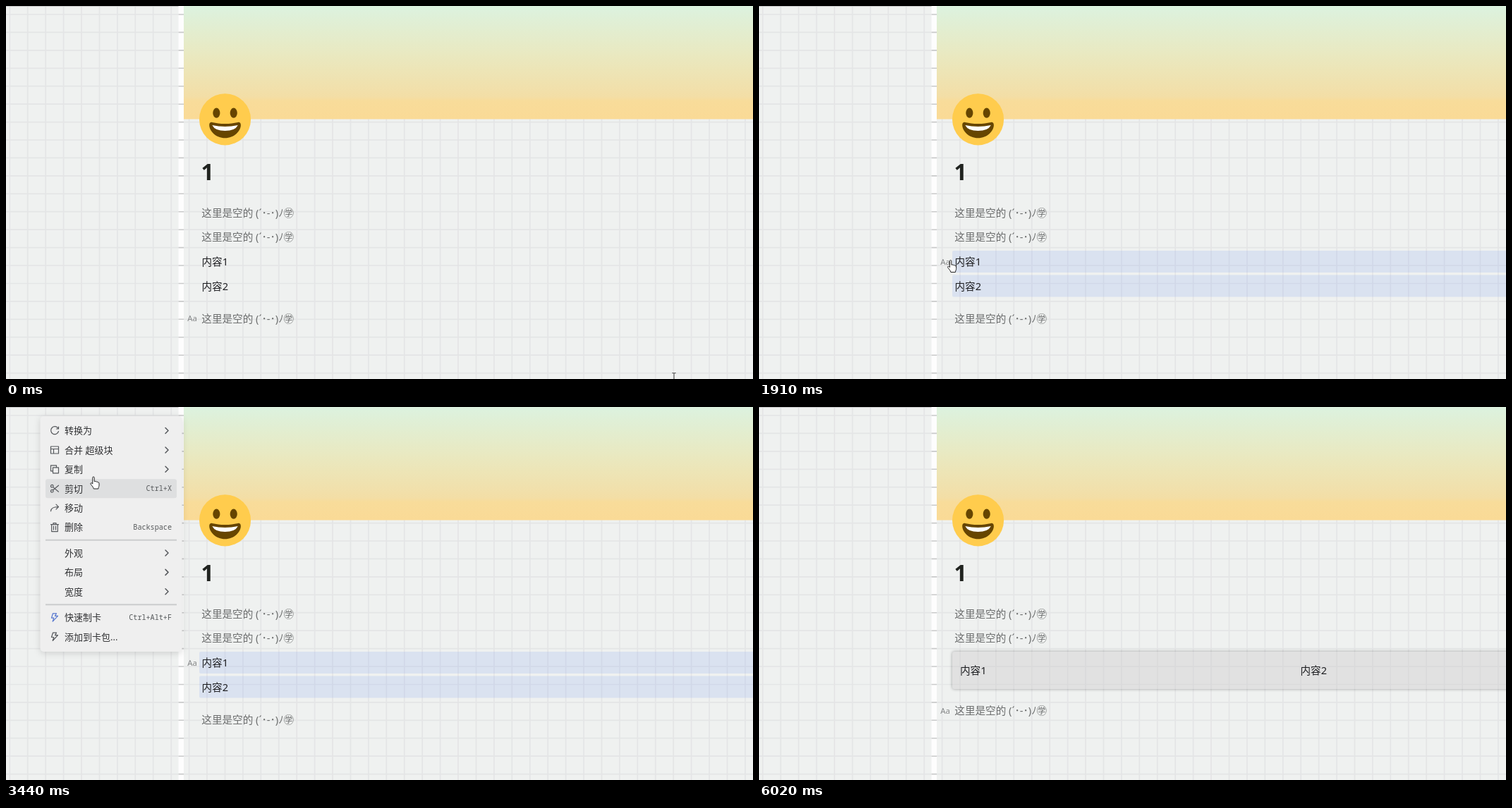
Animation of 1059 by 529 pixels, one loop 6.09 s. Source, as an HTML page:

```html
<!DOCTYPE html>
<html lang="zh-CN">
<head>
<meta charset="utf-8">
<title>Block menu</title>
<style>
  html, body { margin: 0; width: 100%; height: 100%; overflow: hidden; background: #eff1f0; }
  svg { display: block; width: 1059px; height: 529px; }
  text { font-family: "Noto Sans", "Noto Sans CJK SC", "Noto Sans CJK", sans-serif; white-space: pre; }
  .body { font-size: 14.6px; fill: #202124; }
  .empty { font-size: 14.6px; fill: #6c6e6e; }
  .item { font-size: 13px; fill: #303133; }
  .key { font: 10.15px "Noto Sans Mono", "DejaVu Sans Mono", monospace; fill: #55585a; text-anchor: end; }
  .tip { font-size: 11px; font-weight: 500; fill: #fff; }
  .icon { fill: none; stroke: #55585c; stroke-width: 1.2; stroke-linejoin: round; stroke-linecap: round; }
  .panel { fill: #efefef; filter: drop-shadow(0 2px 5px rgba(0,0,0,.14)); }
  .hover { fill: #dedfe0; }
  .native { fill: #9db8ee; }
  .caret { fill: #202124; }
</style>
</head>
<body>
<svg id="stage" viewBox="0 0 1059 529">
  <defs>
    <linearGradient id="cover" x1="0" y1="0" x2="0" y2="1">
      <stop offset="0" stop-color="#dcf2df"/>
      <stop offset=".42" stop-color="#e9e9c1"/>
      <stop offset=".8" stop-color="#f3dea6"/>
      <stop offset=".84" stop-color="#f8dc9a"/>
      <stop offset="1" stop-color="#fada96"/>
    </linearGradient>
    <filter id="blockShadow" x="-5%" y="-30%" width="110%" height="160%">
      <feGaussianBlur stdDeviation="2.2"/>
    </filter>
  </defs>
</svg>
<script>
const LOOP = 6090, STEP = 70;
const GRID = 25.43;
const MENU = [2820, 4530];
const SUBMENU = [3800, 4530];
const LAYOUT = 4530;
const svg = document.getElementById('stage');

function add(parent, tag, attrs = {}, text) {
  const el = document.createElementNS('http://www.w3.org/2000/svg', tag);
  for (const k in attrs) el.setAttribute(k, attrs[k]);
  if (text !== undefined) el.textContent = text;
  return parent.appendChild(el);
}
const group = (parent = svg) => add(parent, 'g');
const rect = (p, x, y, width, height, attrs) => add(p, 'rect', { x, y, width, height, ...attrs });
const path = (p, d, attrs) => add(p, 'path', { d, ...attrs });
// y is the middle of the line
function label(p, x, y, cls, size, text) {
  return add(p, 'text', { x, y: y + size * 0.37, class: cls }, text);
}
const icon = (p, x, y, d, attrs) =>
  path(p, d, { class: 'icon', transform: `translate(${x} ${y})`, ...attrs });

// Parts that are visible only during given spans of time
const timed = [];
function during(el, ...spans) {
  timed.push({ el, spans });
  return el;
}

// Backdrop
rect(svg, 0, 0, 1059, 529, { fill: '#eff1f0' });
let lines = '', ticks = '';
for (let x = 5.3; x < 1059; x += GRID) lines += `M${x.toFixed(1)} 0V529`;
for (let y = 12; y < 529; y += GRID) {
  lines += `M0 ${y.toFixed(1)}H1059`;
  ticks += `M244.500 ${y.toFixed(1)}H252`;
}
path(svg, lines, { stroke: '#e4e5e6', 'stroke-width': 1.7 });
rect(svg, 0, 0, 245, 1, { fill: '#c3c4c4' });
rect(svg, 244.5, 0, 7.5, 529, { fill: '#fdfdfd' });
path(svg, ticks, { stroke: '#c9caca', 'stroke-width': 1.6 });
rect(svg, 252, 0, 807, 160.5, { fill: 'url(#cover)' });

// Smiling face
const face = add(svg, 'g', { transform: 'translate(274 124.300) scale(2.030)' });
add(face, 'circle', { cx: 18, cy: 18, r: 18, fill: '#ffcc4d' });
for (const cx of [12, 24]) add(face, 'ellipse', { cx, cy: 13.5, rx: 2.5, ry: 3.5, fill: '#664500' });
path(face, 'M18 21C14.400 21 12 20.600 9 20C8.300 19.900 7 20 7 22C7 26 11.600 31 18 31S29 26 29 22C29 20 27.700 19.900 27 20C24 20.600 21.600 21 18 21Z', { fill: '#664500' });
path(face, 'M9 22Q18 24 27 22Q25 26 18 26T9 22Z', { fill: '#fff' });

// Selected and merged blocks
const blocks = during(group(), [910, LAYOUT]);
for (const y of [347, 381.5]) rect(blocks, 274, y, 790, 31, { rx: 2, fill: '#5a86f0', 'fill-opacity': 0.14 });
const native1 = during(rect(svg, 292, 350.5, 28, 24.5, { class: 'native' }), [1050, 1710]);
const native2 = during(rect(svg, 278, 385.500, 37.5, 24, { class: 'native' }), [840, 1710]);
during(rect(svg, 342.5, 358, 16, 30, { fill: '#c7d7f4', 'fill-opacity': 0.85 }), [980, 1780]);

const merged = during(group(), [LAYOUT, LOOP]);
rect(merged, 274, 347, 800, 53, { rx: 3, fill: '#000', opacity: 0.34, filter: 'url(#blockShadow)' });
rect(merged, 274, 347, 800, 53, { rx: 3, fill: '#e1e1e1' });
let inner = 'M274 368.100H1059M274 393.500H1059';
for (let x = 5.3 + GRID * 11; x < 1059; x += GRID) inner += `M${x.toFixed(1)} 347V400`;
path(merged, inner, { stroke: '#dadadb', 'stroke-width': 1.6 });

// Document text
const EMPTY = '这里是空的 (´･-･)ﾉ㊫';
add(svg, 'text', { x: 276.5, y: 247, 'font-size': 32, 'font-weight': 700, fill: '#20231f' }, '1');
label(svg, 277.3, 293.5, 'empty', 14.6, EMPTY);
label(svg, 277.3, 328, 'empty', 14.6, EMPTY);
const apart = during(group(), [0, LAYOUT]);
label(apart, 277.5, 363, 'body', 14.6, '内容1');
label(apart, 277.5, 397.5, 'body', 14.6, '内容2');
label(apart, 277.3, 443.5, 'empty', 14.6, EMPTY);
label(merged, 285, 374, 'body', 14.6, '内容1');
label(merged, 767.5, 374, 'body', 14.6, '内容2');
label(merged, 277.3, 430.5, 'empty', 14.6, EMPTY);

during(rect(svg, 277.5, 354, 1, 18, { class: 'caret' }), [2800, 3330], [3860, 4390]);
during(rect(svg, 285, 364, 1, 19, { class: 'caret' }), [LAYOUT, 4960], [5490, 6020]);

// Gutter mark: start time and row, 0 hides it
const gutterRows = [[0, 443], [420, 397.5], [840, 0], [1850, 363], [LAYOUT, 0], [4900, 293.5], [5040, 328], [5270, 0], [5410, 430.5]];
const gutter = add(svg, 'text', { x: 257.3, 'font-size': 11.3, fill: '#858788' }, 'Aa');

// Tooltip
const tip = during(group(), [2110, 2820]);
rect(tip, 155.5, 385, 118, 85, { rx: 4, fill: '#6f7070' });
['拖拽 移动位置', '点击 打开菜单', 'Ctrl+Click 进入', 'Alt+Click 折叠/展开', 'Shift+Click 修改属性']
  .forEach((s, i) => label(tip, 162.5, 396.8 + i * 15.5, 'tip', 11, s));

// Menu
const BOLT = 'M1 -5.500H-2.500L-4.500 .800H-1.200L-2.800 5.800L4.500 -2H.500L2.500 -5.500Z';
const CHEVRON = 'M-2 -4L2 0L-2 4';
const items = [
  [33.5, '转换为', '>', 'M5 -3A5.500 5.500 0 1 0 5.500 1M5.500 -5.500V-2.500H2.500'],
  [61, '合并 超级块', '>', 'M-5.500 -5H5.500V5H-5.500ZM-5.500 -1.500H5.500M-1.500 -1.500V5'],
  [88.3, '复制', '>', 'M-2.500 -2.500H5.500V5.500H-2.500ZM-2.500 2.500H-5.500V-5.500H2.500V-2.500'],
  [115.7, '剪切', 'Ctrl+X', 'M-2 -1.800L5.500 4.500M-2 1.800L5.500 -4.500M-5.500 -3.500a1.800 1.800 0 1 0 3.600 0a1.800 1.800 0 1 0 -3.600 0M-5.500 3.500a1.800 1.800 0 1 0 3.600 0a1.800 1.800 0 1 0 -3.600 0'],
  [143.2, '移动', '', 'M-5.500 4.500C-5 0 -2 -1.500 5 -1.500M2 -5L5.500 -1.500L2 2'],
  [170.6, '删除', 'Backspace', 'M-5.500 -4H5.500M-2 -4V-6H2V-4M-4.300 -4V6H4.300V-4M-1.500 -1.500V3.500M1.500 -1.500V3.500'],
  [207, '外观', '>'],
  [234.4, '布局', '>'],
  [261.8, '宽度', '>'],
  [298.3, '快速制卡', 'Ctrl+Alt+F', BOLT],
  [325.7, '添加到卡包...', '', BOLT]
];
const menu = during(group(), MENU);
rect(menu, 48.5, 13, 201, 334, { rx: 5, class: 'panel' });
const hoverRows = [[0, 0], [3100, 8], [3170, 6], [3240, 5], [3310, 4], [3380, 3], [3540, 2], [3740, 1]];
const hover = rect(menu, 56, 0, 186, 27, { rx: 3, class: 'hover' });
for (const y of [187.7, 279.3]) rect(menu, 56, y, 186, 2, { fill: '#cbcccd' });
items.forEach(([y, name, side, shape]) => {
  if (shape) icon(menu, 69, y, shape, name === '快速制卡' ? { style: 'stroke:#5576cf' } : {});
  label(menu, 83, y, 'item', 13, name);
  if (side === '>') icon(menu, 228, y, CHEVRON, { style: 'stroke-width:1.5' });
  else if (side) label(menu, 235, y - 0.2, 'key', 10, side);
});

const sub = during(group(), SUBMENU);
rect(sub, 250, 40.5, 126.5, 70, { rx: 4, class: 'panel' });
during(rect(sub, 257, 48, 112, 27, { rx: 3, class: 'hover' }), [4320, 4530]);
const SPLIT = 'M-5.500 -5.500H-2V5.500H-5.500M5.500 -5.500H2V5.500H5.500';
icon(sub, 271, 62, SPLIT);
icon(sub, 271, 89.5, SPLIT, { transform: 'translate(271 89.500) rotate(90)' });
label(sub, 285, 62, 'item', 13, '水平布局');
label(sub, 285, 89.5, 'item', 13, '垂直布局');

// Pointer
const pointer = group();
during(add(pointer, 'circle', { r: 11, cx: -3, cy: 1, fill: '#eded4c', 'fill-opacity': 0.68 }), [770, 1450]);
during(add(pointer, 'circle', { r: 11, cy: 2, fill: '#eded4c', 'fill-opacity': 0.68 }), [2750, 2880], [4460, 4530]);
const beam = path(pointer, 'M-2.500 -5.500H-.500L0 -5L.500 -5.500H2.500M0 -5V5M-2.500 5.500H-.500L0 5L.500 5.500H2.500',
  { fill: 'none', stroke: '#3c3d3d' });
const hand = path(pointer, 'M-1.200 1.200a1.200 1.200 0 0 1 2.400 0V6.500l1 .2a1.400 1.400 0 0 1 2.200 .6a1.400 1.400 0 0 1 2.100 .7a1.300 1.300 0 0 1 1.500 1.400v2.800c0 1.600 -1 2.600 -1.200 4.800H.300C0 15 -2 13 -4 10.300c-.700 -1 .800 -2.200 1.900 -1.200l.9 1z',
  { fill: '#fff', stroke: '#222', 'stroke-linejoin': 'round' });
during(beam, [0, 1850], [LAYOUT, LOOP]);
during(hand, [1850, LAYOUT]);

// time, x, y
const route = [
  [0, 947, 526], [140, 880, 505], [350, 520, 430], [630, 345, 398], [770, 345, 398],
  [980, 348, 378], [1120, 295, 356], [1450, 295, 356], [1650, 288, 358], [2030, 262, 362],
  [2890, 262, 362], [3150, 190, 240], [3390, 124, 99], [3500, 124, 99],
  [3640, 128, 84], [3780, 140, 62], [4050, 256, 60], [4180, 256, 60],
  [4380, 298, 62], [4520, 300, 63], [4760, 330, 180], [5000, 460, 300],
  [5150, 542, 343], [5260, 542, 343], [5330, 600, 405], [5600, 690, 545], [LOOP, 690, 545]
];

function pointerAt(t) {
  const i = Math.max(1, route.findIndex(k => k[0] > t));
  const [t0, x0, y0] = route[i - 1], [t1, x1, y1] = route[i];
  const k = (t - t0) / (t1 - t0);
  return [x0 + (x1 - x0) * k, y0 + (y1 - y0) * k];
}
const latest = (table, t) => table.filter(row => row[0] <= t).pop()[1];
const show = (el, on) => { el.style.display = on ? '' : 'none'; };

function draw(t) {
  for (const { el, spans } of timed) show(el, spans.some(([a, b]) => t >= a && t < b));

  const [x, y] = pointerAt(Math.floor(t / STEP) * STEP);
  pointer.setAttribute('transform', `translate(${x.toFixed(1)} ${y.toFixed(1)})`);

  const left = Math.min(320, Math.max(292, x - 3));
  native1.setAttribute('x', left);
  native1.setAttribute('width', 320 - left);

  const row = latest(gutterRows, t);
  show(gutter, row);
  gutter.setAttribute('y', row + 4);

  const active = latest(hoverRows, t);
  show(hover, active);
  hover.setAttribute('y', items[active][0] - 13.500);
}

const start = performance.now();
function tick(now) {
  draw(Math.max(0, now - start) % LOOP);
  requestAnimationFrame(tick);
}
draw(0);
requestAnimationFrame(tick);
</script>
</body>
</html>
```
